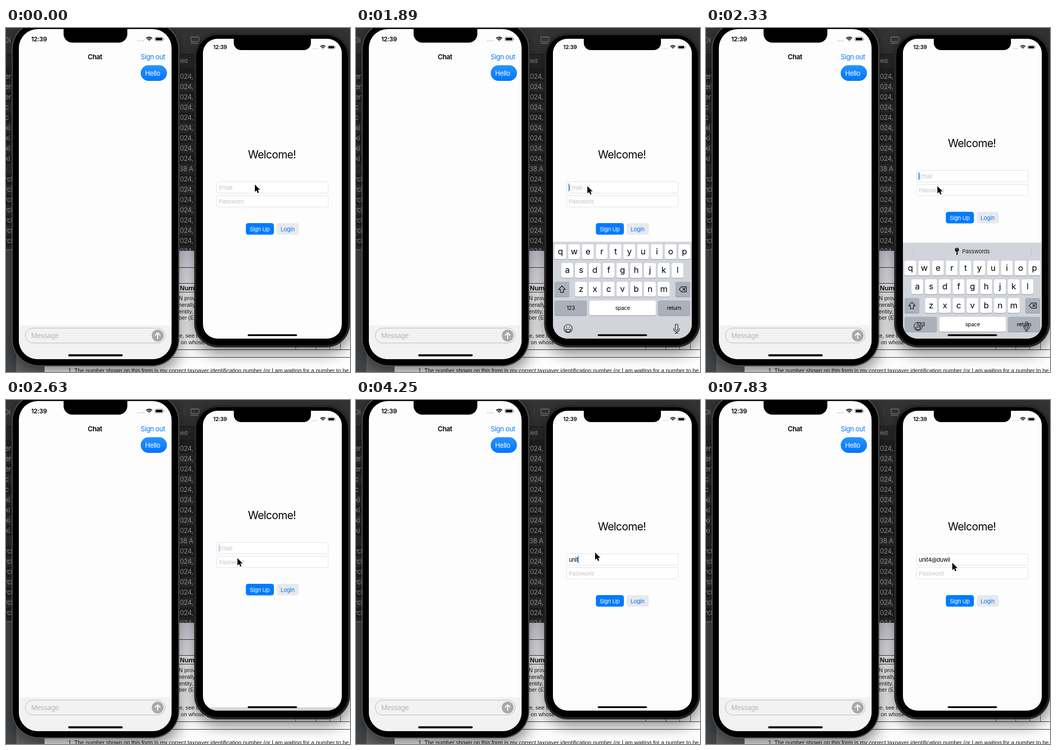
An HTML page with a canvas that plays this animation: 669 px wide and 670 px high, repeating every 8 s.

```html
<!DOCTYPE html>
<html lang="en">
<head>
<meta charset="utf-8">
<title>Chat sign-in</title>
<style>
  html, body { margin: 0; width: 100%; height: 100%; overflow: hidden; background: #222; }
  canvas { display: block; }
</style>
</head>
<body>
<canvas id="stage" width="669" height="670"></canvas>
<script>
const ctx = document.getElementById('stage').getContext('2d');
const LOOP = 8000;
const TICK = 148.5, TICK_START = 90;
const BLUE = '#007aff';

const clamp = v => Math.min(1, Math.max(0, v));
const ramp = (t, from, to) => clamp((t - from) / (to - from));
const smooth = (t, from, to) => { const p = ramp(t, from, to); return p * p * (3 - 2 * p); };
const easeOut = (t, from, to) => 1 - (1 - ramp(t, from, to)) ** 3;

// Pointer moves: start, end, dx, dy
const glides = [
  [100, 400, -15, 0], [720, 1150, -19, 3], [2770, 3660, 8, -21],
  [3660, 4240, 7, 10], [4400, 4840, 14, 20]];

function pointerAt(t) {
  let x = 483, y = 304;
  for (const [from, to, dx, dy] of glides) {
    const p = smooth(t, from, to);
    x += dx * p;
    y += dy * p;
  }
  return [x, y];
}

// Bursts of typing: letters, start, end
const bursts = [
  ['unit', 2760, 3210], ['4', 4700, 4840], ['@', 6180, 6320], ['duwi', 6480, 6915], ['l', 7070, 7210]];

const typedAt = t => bursts.map(([s, from, to]) => s.slice(0, Math.ceil(s.length * ramp(t, from, to)))).join('');

function caretAt(t) {
  if (t < 1150) return 0;
  const lastKey = bursts.findLast(([, from]) => from < t)?.[2] ?? 2080;
  const phase = Math.max(0, t - lastKey) % 1050;
  return clamp((Math.abs(phase - 615) - 25) / 150);
}

const liftAt = t => 22 * (smooth(t, 1890, 2190) - smooth(t, 2770, 3220));

function keyboardAt(t) {
  const rise = 198 * (1 - easeOut(t, 1575, 2020));
  const drop = 222 * smooth(t, 2200, 2640) + 10 * ramp(t, 2780, 2900);
  return { offset: rise + drop - 8, hasBar: t > 2000, dockY: 578 + rise + drop * drop / 500 };
}

function box(x, y, w, h, r, fill, stroke, line = 1) {
  ctx.beginPath();
  ctx.roundRect(x, y, w, h, r);
  if (fill) { ctx.fillStyle = fill; ctx.fill(); }
  if (stroke) { ctx.strokeStyle = stroke; ctx.lineWidth = line; ctx.stroke(); }
}

// y is the middle of the capitals
function text(s, x, y, size, color, { weight = 400, align = 'left', family = 'Inter', track = -.03 } = {}) {
  ctx.font = `${weight} ${size}px "${family}", sans-serif`;
  ctx.letterSpacing = `${size * track}px`;
  ctx.textAlign = align;
  ctx.fillStyle = color;
  ctx.fillText(s, x, y + size * .364);
}

function path(d, x, y, { fill, stroke, line = 1 }) {
  const shape = new Path2D(d);
  ctx.save();
  ctx.translate(x, y);
  ctx.lineJoin = ctx.lineCap = 'round';
  if (stroke) { ctx.strokeStyle = stroke; ctx.lineWidth = line; ctx.stroke(shape); }
  if (fill) { ctx.fillStyle = fill; ctx.fill(shape); }
  ctx.restore();
}

function gradient(y0, y1, ...colors) {
  const g = ctx.createLinearGradient(0, y0, 0, y1);
  colors.forEach((c, i) => g.addColorStop(i / (colors.length - 1), c));
  return g;
}

function fileWindow() {
  box(0, 0, 669, 434, 0, '#232323');
  box(0, 0, 669, 52, 0, '#343434');
  box(0, 51, 669, 1, 0, '#151515');
  box(0, 52, 669, 25, 0, '#2b2b2b');
  text('Di', -4, 24, 14, '#777', { weight: 600 });
  text('ied', 338, 64, 11, '#a0a0a0');
  box(346, 15, 1, 17, 0, '#4a4a4a');
  box(359.5, 17.5, 16, 9, 2, null, '#777', 1.3);
  box(359, 29, 17, 1.5, 0, '#777');
  for (let row = 0; row < 18; row++) {
    const y = 94.5 + row * 20;
    const kind = row < 3 ? 'er' : row < 5 ? 'c' : row < 9 ? 'ki' : row > 9 ? 'rcl' : '';
    if (row % 2) box(0, y - 10, 669, 20, 0, '#2e2e2e');
    text(kind, -2, y, 13, '#aaa');
    text(kind ? '2024,' : '9:38 A', 364, y, 13, '#a8a8a8', { align: 'right' });
  }
}

function paperForm() {
  const arial = { family: 'Liberation Sans', track: 0 };
  box(0, 434, 669, 236, 0, '#45484b');
  box(20, 434, 55, 236, 0, '#66676a');
  box(75, 434, 594, 236, 0, '#fff');
  box(75, 434, 594, 64, 0, gradient(434, 498, '#d3d4de', '#e9e9f1', '#f6f6fa'));
  for (const y of [466, 497, 514, 626, 641]) box(75, y, 594, 1, 0, '#333');
  for (const x of [563, 602, 629, 650]) box(x, 600, 1, 26, 0, '#555');
  text('Number', 338, 506, 13, '#111', { ...arial, weight: 700 });
  ['N provided', 'nerally', 'entity, it', 'ber (EIN)'].forEach((s, i) => text(s, 336, 526 + i * 12.8, 10.8, '#222', arial));
  ['e, see the', ' on whose number'].forEach((s, i) => text(s, 337, 599 + i * 13, 10.8, '#222', arial));
  text('1. The number shown on this form is my correct taxpayer identification number (or I am waiting for a number to be issued',
    121, 667, 10.85, '#111', arial);
}

function phoneBody(x, y, w, h, r, rim, rimColor) {
  ctx.save();
  ctx.shadowColor = 'rgba(0,0,0,.55)';
  ctx.shadowBlur = 32;
  ctx.shadowOffsetY = 10;
  box(x, y, w, h, r, rimColor);
  ctx.restore();
  box(x + rim, y + rim, w - 2 * rim, h - 2 * rim, r - rim, '#000');
}

// Fills the display and clips to it while its content is drawn
function onScreen(x, y, w, h, r, content) {
  ctx.save();
  box(x, y, w, h, r, '#fdfdfd');
  ctx.clip();
  content();
  ctx.restore();
}

// k scales the status icons; (x, y) is the left end and middle of the row
function statusIcons(x, y, k) {
  ctx.save();
  ctx.translate(x, y);
  ctx.scale(k, k);
  for (let i = 0; i < 4; i++) box(i * 3.6, 2.5, 2.2, 2.2, 1.1, '#c4c4c4');
  ctx.strokeStyle = '#000';
  ctx.lineWidth = 2;
  for (const r of [1, 4.3, 7.6]) {
    ctx.beginPath();
    ctx.arc(23.5, 4, r, -Math.PI * .76, -Math.PI * .24);
    ctx.stroke();
  }
  box(34.5, -4, 16, 8, 2.5, null, '#999');
  box(36, -2.5, 13, 5, 1.3, '#000');
  box(51.3, -1.3, 1.3, 2.8, .6, '#999');
  ctx.restore();
}

function chatPhone() {
  phoneBody(11, -12, 326, 671, 53, 2, '#4c4c4d');
  onScreen(25, 2, 297, 643, 37, () => box(25, 579, 297, 66, 0, '#f2f2f2'));
  box(112, -10, 124, 38.5, [0, 0, 17, 17], '#000');
  text('12:39', 49, 21.5, 12.2, '#000', { weight: 600 });
  statusIcons(255, 21.5, 1);
  text('Chat', 159, 56, 13, '#000', { weight: 600 });
  text('Sign out', 262, 56, 13, BLUE);
  box(262, 72.5, 51, 30.5, 15.2, gradient(73, 103, '#2592ff', '#0076fb'));
  text('Hello', 270.5, 88, 13, '#fff');
  box(37.5, 584.5, 272, 29, 14.5, null, '#b9b9b9');
  text('Message', 49, 599, 13, '#b6b6b8');
  box(283.5, 587.5, 23, 23, 11.5, '#a9a9a9');
  path('M0 5.5V-5M-4.5 -.8L0 -5.3L4.5 -.8', 295, 599, { stroke: '#fff', line: 2 });
  box(121, 635.5, 106, 4, 2, '#000');
}

function key(label, x, y, w, dark, size = 10.5) {
  box(x, y + 1, w, 29, 3.5, '#8f9298');
  box(x, y, w, 29, 3.5, dark ? '#abb0ba' : '#fff');
  text(label, x + w / 2, y + (size > 12 ? 13.5 : 14.5), size, '#000', { align: 'center' });
}

function keyboard({ offset, hasBar, dockY }) {
  const keysY = 422 + offset;
  const top = keysY - (hasBar ? 35 : 5);
  box(383, top, 270, 300, 0, '#d1d4da');
  if (hasBar) {
    const mid = top + 17;
    for (const x of [403, 632]) box(x, mid - 7, 1, 15, 0, '#c0c3c9');
    box(484, mid - 7, 8, 8, 4, '#222');
    path('M0 0V6.5M0 4H1.5', 488, mid, { stroke: '#222', line: 2 });
    box(487.2, mid - 5.6, 1.6, 1.6, .8, '#d1d4da');
    text('Passwords', 498, mid, 11, '#222');
  }
  ['qwertyuiop', 'asdfghjkl', 'zxcvbnm'].forEach((letters, row) => {
    const left = 506.5 - letters.length * 13.4 + 13.4;
    [...letters].forEach((c, i) => key(c, left + i * 26.8, keysY + row * 36.5, 23, false, 16.5));
  });
  const row3 = keysY + 73, row4 = keysY + 109.5;
  key('', 386, row3, 29, true);
  path('M0 -6.5L6.5 .5H3V6H-3V.5H-6.5Z', 400.5, row3 + 14.5, { stroke: '#111', line: 1.2 });
  key('', 621, row3, 29, true);
  path('M-7 0L-2.5 -5H7V5H-2.5ZM0 -2.3L4.4 2.3M4.4 -2.3L0 2.3', 635.5, row3 + 14.5, { stroke: '#111', line: 1.2 });
  key('123', 386, row4, 63, true);
  key('space', 454, row4, 129, false);
  key('return', 587, row4, 63, true);
  const ink = { stroke: '#33363b', line: 1.3 };
  path('M8 0A8 8 0 1 1 -8 0A8 8 0 1 1 8 0M-5 1.5A5 5 0 0 0 5 1.5ZM-2.8 -3.5V-2M2.8 -3.5V-2', 412.5, dockY, ink);
  path('M-2.6 -6A2.6 2.6 0 0 1 2.6 -6V1A2.6 2.6 0 0 1 -2.6 1ZM-5.5 0V1.5A5.5 5 0 0 0 5.5 1.5V0M0 6.5V9M-3 9H3', 623.5, dockY, ink);
}

function loginForm(t) {
  const typed = typedAt(t);
  ctx.save();
  ctx.translate(0, -liftAt(t));
  text('Welcome!', 470.5, 246, 21, '#000');
  for (const y of [299.5, 326.5]) box(409.5, y, 217, 22, 3, '#fff', '#e3e3e5');
  text('Password', 414, 338, 11, '#c6c6c9');
  text(typed || 'Email', 414, 310.5, 11, typed ? '#000' : '#c6c6c9');
  const end = typed ? ctx.measureText(typed).width : 0;
  ctx.globalAlpha = caretAt(t);
  box(413.5 + end, 303, 1.5, 15, .5, BLUE);
  ctx.globalAlpha = 1;
  box(466.5, 380, 54.5, 22.5, 4.5, BLUE);
  text('Sign Up', 474, 391.5, 11, '#fff');
  box(526.5, 380, 43, 22.5, 4.5, '#e9e9eb');
  text('Login', 534, 391.5, 11, BLUE);
  ctx.restore();
}

function loginPhone(t) {
  phoneBody(366, 10, 303, 612, 46, 4, '#262627');
  onScreen(383, 21, 270, 584, 28, () => {
    loginForm(t);
    keyboard(keyboardAt(t));
  });
  box(443, 18, 150, 25, [0, 0, 14, 14], '#000');
  text('12:39', 403, 37.5, 10.6, '#000', { weight: 600 });
  statusIcons(596, 37.3, .86);
  box(470, 596.5, 96, 3.5, 1.75, '#000');
}

function pointer([x, y]) {
  path('M1 1V15.2L4.3 12.2L6.6 17.6L9 16.6L6.7 11.3H11.2Z', x, y, { fill: '#000', stroke: '#fff', line: 1.8 });
}

function draw() {
  const now = performance.now() % LOOP;
  const t = TICK_START + Math.floor((now - TICK_START) / TICK) * TICK;
  fileWindow();
  paperForm();
  chatPhone();
  loginPhone(t);
  pointer(pointerAt(t));
  requestAnimationFrame(draw);
}
draw();
</script>
</body>
</html>
```
